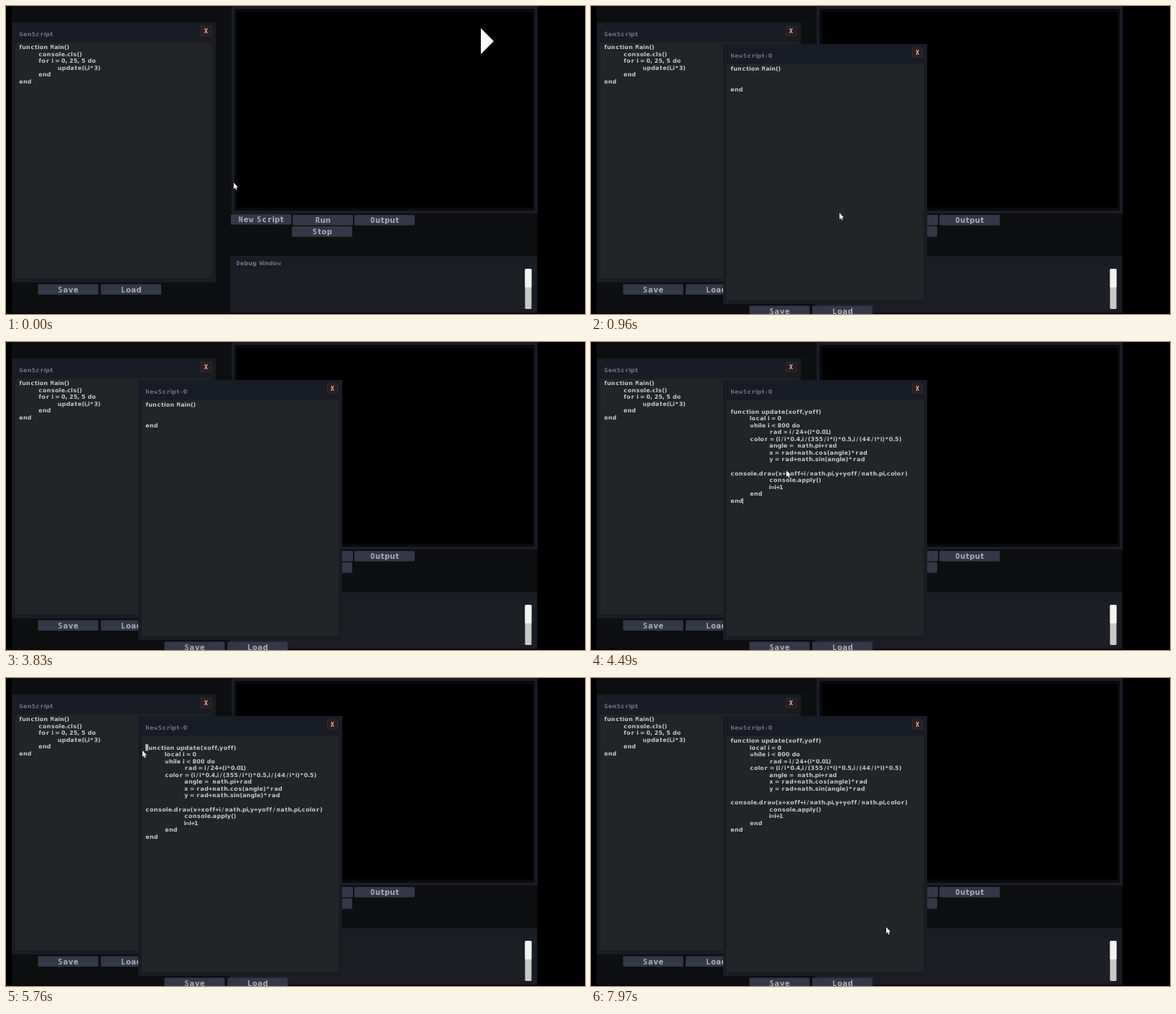
Animation, 806 px wide and 429 px high, one loop 8 s. Source, as an HTML page with a canvas:

```html
<!DOCTYPE html>
<html lang="en">
<head>
<meta charset="utf-8">
<title>Script editor</title>
<style>
  html, body { margin: 0; width: 100%; height: 100%; overflow: hidden; background: #000; }
  canvas { display: block; width: 806px; height: 429px; }
</style>
</head>
<body>
<canvas id="stage" width="806" height="429"></canvas>
<script>
const ctx = document.getElementById('stage').getContext('2d');
const LOOP = 8000;
const LINE = 9.55;
const TAB = 27;
const CODE_SIZE = 9;
const BUTTON_SIZE = 11.4;

const mainScript = [
  'function Main()',
  '\tconsole.cls()',
  '\tfor i = 0, 25, 5 do',
  '\t\tupdate(i,i*3)',
  '\tend',
  'end'
];
const emptyScript = ['function Main()', '', '', 'end'];
const spiralScript = [
  'function update(xoff,yoff)',
  '\tlocal i = 0',
  '\twhile i < 800 do',
  '\t\trad = i/24+(i*0.01)',
  '\tcolor = (i/i*0.4,i/(355/i*i)*0.5,i/(44/i*i)*0.5)',
  '\t\tangle =  math.pi+rad',
  '\t\tx = rad+math.cos(angle)*rad',
  '\t\ty = rad+math.sin(angle)*rad',
  '',
  'console.draw(x+xoff+i/math.pi,y+yoff/math.pi,color)',
  '\t\tconsole.apply()',
  '\t\ti=i+1',
  '\tend',
  'end'
];

// Pointer stops: time, x, y
const pointerPath = [
  [0, 317, 246], [40, 317, 246], [790, 352, 298], [880, 352, 298],
  [1640, 160, -14], [3830, 262, -14], [4450, 272, 179], [4650, 272, 179],
  [5350, 190, 101], [6280, 190, 101], [6570, 197, 106], [7470, 197, 106],
  [7960, 411, 347], [LOOP, 411, 347]
];

function rect(x, y, w, h, color) {
  ctx.fillStyle = color;
  ctx.fillRect(x, y, w, h);
}

function roundRect(x, y, w, h, color) {
  ctx.beginPath();
  ctx.roundRect(x, y, w, h, 1.5);
  ctx.fillStyle = color;
  ctx.fill();
}

function shape(points, color) {
  ctx.beginPath();
  points.forEach(([x, y]) => ctx.lineTo(x, y));
  ctx.closePath();
  ctx.fillStyle = color;
  ctx.fill();
}

// Letter advance in em: wide letters share one width, thin ones are narrow
function advance(ch) {
  if ('il.,'.includes(ch)) return 0.27;
  if (ch === ' ') return 0.32;
  if ('()1'.includes(ch)) return 0.4;
  if (ch === 'f') return 0.47;
  if (ch === 't') return 0.51;
  if ('+-=<'.includes(ch)) return 0.556;
  return 0.644;
}

function textWidth(str, size) {
  return [...str].reduce((sum, ch) => sum + advance(ch) * size, 0);
}

// Broad letters come from the monospaced face so that they fit the shared width
function text(str, x, baseline, color, size = CODE_SIZE) {
  ctx.fillStyle = color;
  ctx.textAlign = 'center';
  for (const ch of str) {
    if (ch === '\t') { x += TAB; continue; }
    const family = /[A-Zmw]/.test(ch) ? '"DejaVu Sans Mono", monospace' : '"DejaVu Sans", sans-serif';
    const w = advance(ch) * size;
    ctx.font = `bold ${size * 0.88}px ${family}`;
    ctx.fillText(ch, x + w / 2, baseline);
    x += w;
  }
}

function button(label, x, y, color = '#343846') {
  roundRect(x, y, 84, 14.5, color);
  text(label, x + 42 - textWidth(label, BUTTON_SIZE) / 2, y + 11, '#a9adb8', BUTTON_SIZE);
}

function scriptWindow(x, y, title, lines) {
  rect(x, y, 284, 362, '#181c24');
  rect(x + 4, y + 26, 276, 331, '#1b1d22');
  rect(x + 5, y + 28, 274, 328, '#222428');
  text(title, x + 10, y + 19, '#737780');
  rect(x + 263, y + 5, 15, 14, '#3c2826');
  rect(x + 264, y + 6, 13, 12, '#2c1c1c');
  text('X', x + 267.3, y + 15.2, '#c9bebb', 10);
  lines.forEach((line, i) => text(line, x + 10, y + 37 + i * LINE, '#c5c9c7'));
  button('Save', x + 36.5, y + 364.5);
  button('Load', x + 124, y + 364.5);
}

function desktop(hover) {
  rect(0, 0, 806, 429, '#000');
  rect(8, 0, 732, 428, '#0d0e10');
  rect(314, 0, 426, 289, '#1a1d27');
  rect(318, 4, 418, 281, '#0a0a0d');
  rect(322, 8, 411, 273, '#000');
  button('New Script', 313, 290, hover ? '#262936' : '#343846');
  button('Run', 399, 291);
  button('Output', 485, 291);
  button('Stop', 398, 307);
  rect(312, 348, 427, 79, '#1a1c26');
  rect(317, 366, 405, 56, '#1d1f24');
  text('Debug Window', 320, 360.5, '#737780');
  roundRect(722.5, 366, 9, 56, '#c9c9c9');
  roundRect(722.5, 366, 9, 26, '#f3f3f3');
}

function pointerAt(t) {
  const i = Math.max(1, pointerPath.findIndex(p => p[0] > t));
  const [t0, x0, y0] = pointerPath[i - 1];
  const [t1, x1, y1] = pointerPath[i];
  const p = (t - t0) / (t1 - t0);
  const eased = p * p * (3 - 2 * p);
  return [x0 + (x1 - x0) * eased, y0 + (y1 - y0) * eased];
}

function pointer(x, y) {
  const arrow = [[0, 0], [0, 8.8], [2, 7.1], [3.3, 10.2], [4.6, 9.6], [3.4, 6.7], [5.9, 6.4]];
  shape(arrow.map(([dx, dy]) => [x + dx, y + dy]), '#fff');
}

function newScriptLines(t) {
  if (t < 4490) return emptyScript;
  return t < 7440 ? ['', ...spiralScript] : spiralScript;
}

function caret(t) {
  if (t >= 4490 && t < 4650) rect(211, 217, 1, 9, '#8d919a');
  if (t >= 5730 && t < 6020) {
    rect(194, 92, 4, 9.5, '#9298a6');
    text('f', 194, 99.6, '#c5c9c7');
  }
  if ((t >= 6280 && t < 6570) || (t >= 6810 && t < 7080)) rect(194, 83, 1, 9, '#8d919a');
}

function draw(t) {
  const [x, y] = pointerAt(t);
  desktop(t < 890 && y > 290);
  scriptWindow(8, 23, 'GenScript', mainScript);
  if (t >= 890) {
    scriptWindow(184, 53, 'NewScript-0', newScriptLines(t));
    caret(t);
  }
  if (t < 40) shape([[661, 31], [679, 49], [661, 67]], '#fff');
  if (t < 1640 || t >= 3830) pointer(x, y);
}

const start = performance.now();
function tick() {
  draw((performance.now() - start) % LOOP);
  requestAnimationFrame(tick);
}
draw(0);
requestAnimationFrame(tick);
</script>
</body>
</html>
```
